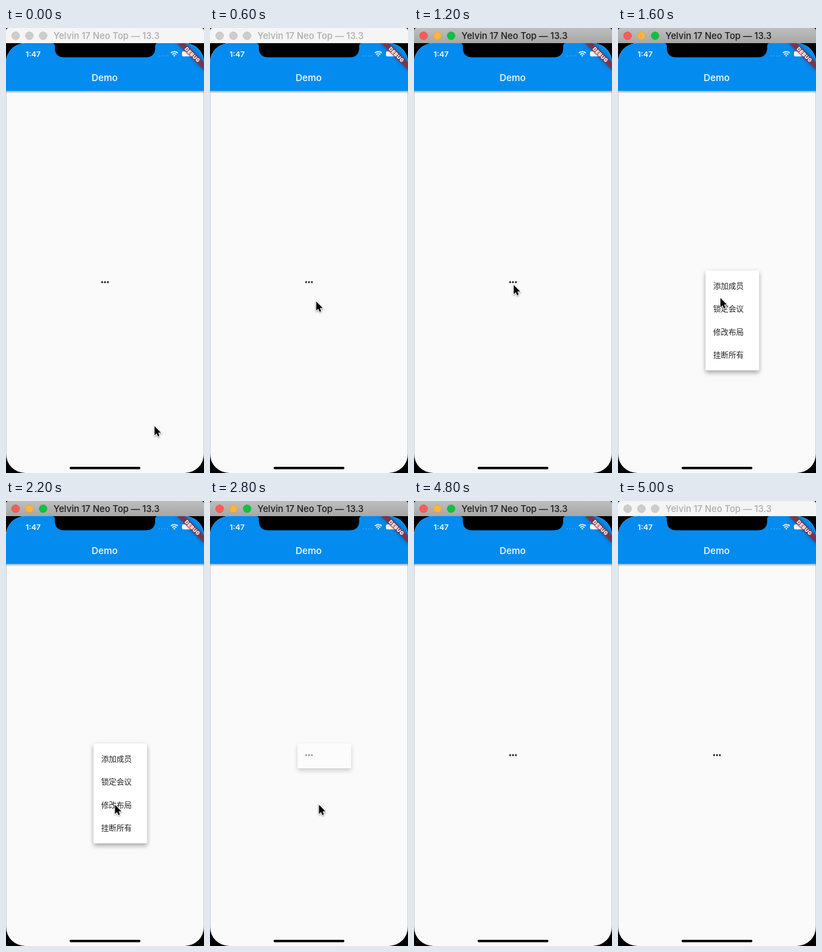
An HTML page for the animation above (5200 ms loop, 288 by 646 pixels).

```html
<!DOCTYPE html>
<html lang="zh">
<head>
<meta charset="utf-8">
<style>
  html, body { margin: 0; width: 100%; height: 100%; overflow: hidden; background: #000; }
  svg { display: block; width: 288px; height: 646px; font-family: Inter, Roboto, sans-serif; }
  #bar { fill: url(#activeBar); }
  #caption { fill: #1c1c1c; font-size: 13px; font-weight: 500; }
  .light { stroke-width: .6; }
  .inactive #bar { fill: #f5f5f5; }
  .inactive #caption { fill: #adadad; }
  .inactive .light { fill: #cdcdcd; stroke: #b9b9b9; }
  #panel { filter: drop-shadow(.5px 4px 3px rgba(0,0,0,.24)) drop-shadow(0 1px 3px rgba(0,0,0,.12)); }
  #items { font: 11.13px "Noto Sans CJK SC", "Noto Sans CJK", sans-serif; fill: #222; }
  #cursor { filter: drop-shadow(0 1px 1px rgba(0,0,0,.4)); }
</style>
</head>
<body>
<svg id="stage" viewBox="0 0 288 646">
  <defs>
    <linearGradient id="activeBar" x2="0" y2="1">
      <stop stop-color="#bebebe"/><stop offset="1" stop-color="#a7a7a7"/>
    </linearGradient>
    <linearGradient id="barShadow" x2="0" y2="1">
      <stop stop-color="#000" stop-opacity=".3"/><stop offset="1" stop-color="#000" stop-opacity="0"/>
    </linearGradient>
    <clipPath id="screen"><rect y="22" width="288" height="624" rx="28"/></clipPath>
  </defs>

  <!-- window title bar -->
  <path id="bar" d="M0 22V4Q0 0 4 0H284Q288 0 288 4V22Z"/>
  <circle class="light" cx="14" cy="11.3" r="5.7" fill="#fc5b57" stroke="#df4744"/>
  <circle class="light" cx="34" cy="11.3" r="5.7" fill="#fcb43c" stroke="#de9f34"/>
  <circle class="light" cx="54" cy="11.3" r="5.7" fill="#0fc042" stroke="#27aa35"/>
  <text id="caption" x="69" y="16">Yelvin 17 Neo Top — 13.3</text>

  <!-- phone screen -->
  <g clip-path="url(#screen)">
    <rect y="22" width="288" height="624" fill="#fafafa"/>
    <rect y="91.5" width="288" height="3.5" fill="url(#barShadow)"/>
    <path d="M.5 92V646M287.5 92V646" stroke="#000" stroke-opacity=".16"/>
    <rect y="22" width="288" height="69.5" fill="#038bef"/>
    <path d="M67 22Q71 22 71 26V28.5Q71 42.5 85 42.5H203Q217 42.5 217 28.5V26Q217 22 221 22Z"/>
    <g fill="#fff">
      <text x="28.5" y="42" font-size="11" font-weight="600">1:47</text>
      <text x="143.5" y="77" font-size="13.6" font-weight="500" text-anchor="middle">Demo</text>
      <path d="M222 40.5H236" stroke="#fff" stroke-width="1.4" stroke-dasharray="2 2" opacity=".2"/>
      <path d="M239.7 36.3A7.2 7.2 0 0 1 249.9 36.3M241.8 38.5A4.3 4.3 0 0 1 247.8 38.5"
            fill="none" stroke="#fff" stroke-width="1.5"/>
      <path d="M243.2 39.9Q244.8 38.8 246.4 39.9L244.8 41.6Z"/>
      <rect x="256" y="33.8" width="15" height="7.4" rx="2"/>
    </g>
    <g transform="translate(288 22) rotate(45)">
      <rect x="-28" y="19.5" width="56" height="8.4" fill="#b71c1c" fill-opacity=".63"
            style="filter: drop-shadow(0 0 2.5px rgba(0,0,0,.5))"/>
      <text y="26.4" fill="#fff" font-size="7.4" font-weight="900" letter-spacing=".4"
            text-anchor="middle">DEBUG</text>
    </g>
    <g fill="#222">
      <circle cx="139.8" cy="369" r="1.4"/><circle cx="144" cy="369" r="1.4"/><circle cx="148.2" cy="369" r="1.4"/>
    </g>
    <rect x="92.5" y="637" width="103" height="3.4" rx="1.7"/>
  </g>

  <g id="menu">
    <rect id="panel" x="127.3" y="352" width="78" rx="1.4" fill="#fff"/>
    <g id="items"></g>
  </g>

  <path id="cursor" d="M0 1V14.3L3.1 11.4 5.1 15.9 7.2 15 5.3 10.5H9.5Z"
        stroke="#fff" stroke-width="1.8" paint-order="stroke"/>
</svg>
<script>
const LOOP = 5200, STEP = 200, ROW = 33.4, MENU_HEIGHT = 145;
const $ = id => document.getElementById(id);

// [start ms, tip x, tip y]
const pointer = [
  [0, 216, 577], [200, 186, 506], [400, 154, 408], [600, 154.5, 396],
  [800, 148, 377], [1000, 145, 372], [1600, 149, 391], [1800, 154, 419],
  [2000, 154, 421], [2200, 158.5, 440], [3200, 143, 381],
  [3400, 142, 375], [3600, 143, 374], [4200, 176, 480], [4400, -50, -50]
];
// [start ms, how far the menu route has opened]
const opening = [[0, 0], [1400, .5], [1600, 1], [2800, .18], [3000, 0]];

const items = ['添加成员', '锁定会议', '修改布局', '挂断所有'].map((label, i) => {
  const text = document.createElementNS('http://www.w3.org/2000/svg', 'text');
  text.textContent = label;
  text.setAttribute('x', 138.4);
  text.setAttribute('y', 378.7 + i * ROW);
  return $('items').appendChild(text);
});

const at = (track, t) => track.findLast(key => key[0] <= t).slice(1);
const interval = (p, from, to) => Math.min(1, Math.max(0, (p - from) / (to - from)));

function draw(t) {
  $('stage').classList.toggle('inactive', t < 1200 || t >= 5000);

  const [x, y] = at(pointer, t);
  $('cursor').setAttribute('transform', `translate(${x} ${y})`);

  // The panel unrolls while its rows fade in one after another.
  const [p] = at(opening, t);
  const unit = 1 / (items.length + 1.5);
  $('menu').setAttribute('opacity', interval(p, 0, 1 / 3));
  $('panel').setAttribute('height', MENU_HEIGHT * interval(p, 0, unit * items.length));
  items.forEach((item, i) =>
    item.setAttribute('opacity', interval(p, (i + 1) * unit, (i + 2.5) * unit)));
}

const start = performance.now();
function tick() {
  const t = (performance.now() - start) % LOOP;
  draw(Math.floor(t / STEP) * STEP);
  requestAnimationFrame(tick);
}
tick();
</script>
</body>
</html>
```
